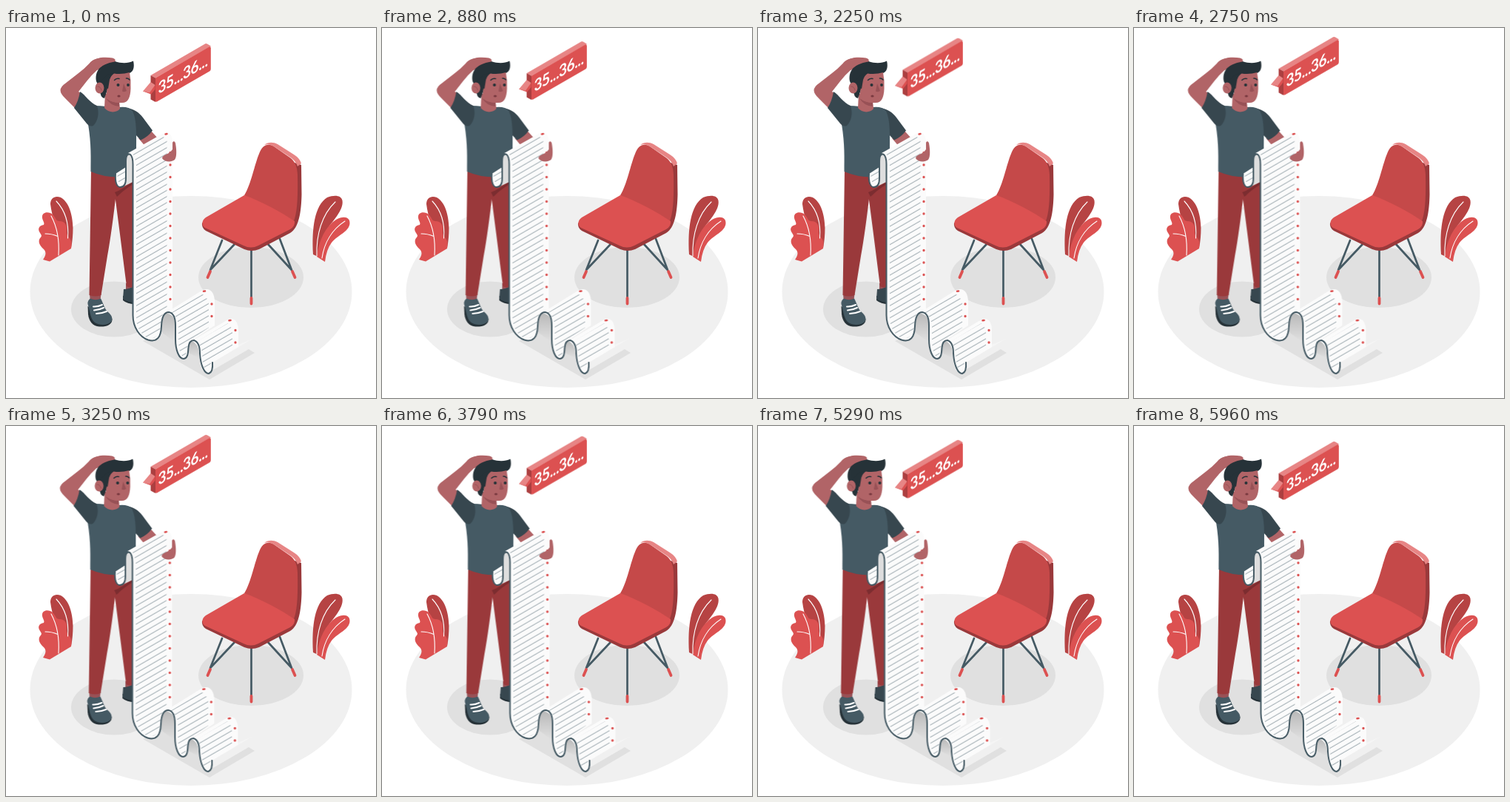
These frames come from a looping animation (500x500 px, 6 s). An HTML page without scripts:

```html
<!DOCTYPE html>
<html lang="en">
<head>
<meta charset="utf-8">
<title>Counting chairs</title>
<style>
  html, body { margin: 0; width: 100%; height: 100%; overflow: hidden; background: #fff; }
  svg { display: block; width: 100vw; height: 100vh; }
  .red { fill: #dc5151; }
  .mid { fill: #c54949; }
  .leaf { fill: #b64343; }
  .deep { fill: #9a393b; }
  .pink { fill: #e78585; }
  .skin { fill: #b16467; }
  .shade { fill: #985156; }
  .shirt { fill: #455a64; }
  .sleeve { fill: #37474f; }
  .ink { fill: #263238; }
  .floor { fill: #f0f0f0; }
  .shadow { fill: #e0e0e0; }
  .sheet { fill: #fbfbfb; }
  .line { fill: none; stroke-linecap: round; stroke-linejoin: round; }
  .vein { stroke: #fff; stroke-width: 1.1; }
  .steel { stroke: #455a64; stroke-width: 2.7; }
  .tip { stroke: #dc5151; stroke-width: 3.8; }
  .edge { stroke: #455a64; stroke-width: 2; }
  .lace { stroke: #fff; stroke-width: 2; }
  .face { stroke: #263238; stroke-width: 1.5; }
  .dots { stroke: #dc5151; stroke-width: 3.3; stroke-dasharray: 0 16.5; }
  text { font: 700 22px Lato, "Open Sans", sans-serif; letter-spacing: -.5px; fill: #fff; }

  .shake { animation: shake 6s linear infinite; }
  .float { animation: float 6s linear infinite; }
  @keyframes shake {
    0%, 100% { transform: translateX(0); }
    10%, 90% { transform: translateX(-1px); }
    20%, 80% { transform: translateX(2px); }
    30%, 50%, 70% { transform: translateX(-4px); }
    40%, 60% { transform: translateX(4px); }
  }
  @keyframes float {
    0%, 100% { transform: translateY(0); }
    50% { transform: translateY(-10px); }
  }
</style>
</head>
<body>
<svg viewBox="0 0 500 500">
  <defs>
    <pattern id="rules" width="60" height="8.25" patternUnits="userSpaceOnUse" patternTransform="skewY(-30)">
      <path d="M0 6.7H60" stroke="#87959d" stroke-width="1"/>
    </pattern>
    <pattern id="foldRules" href="#rules" patternTransform="translate(0 4.1) skewY(-30)"/>
    <linearGradient id="under" x2="0" y2="1">
      <stop offset="0" stop-color="#b9b9b9"/>
      <stop offset="1" stop-color="#e2e2e2"/>
    </linearGradient>
  </defs>

  <!-- floor -->
  <ellipse class="floor" cx="250" cy="356.5" rx="217.5" ry="129.5"/>
  <ellipse class="shadow" cx="146" cy="380" rx="58" ry="37.5"/>
  <ellipse class="shadow" cx="331" cy="337" rx="71" ry="41"/>
  <path class="shadow" d="M185 423L275 475L336 439L328 434L280 462L225 405Z"/>

  <!-- left plant -->
  <path class="leaf" d="M60 238C60 229 67 226 74 229C85 235 90 252 90.500 270Q90.500 285 88 297L72 300C70 275 62 255 60 238Z"/>
  <path class="red" d="M50 313C55 306 54 302 51 299C45 294 43 288 46 284C49 281 48 280 46 277C42 271 45 267 51 266C53 263 48 259 49 254C50 248 59 248 63 252C68 257 67 261 72 261C80 261 83 267 82 274C81 281 86 282 88 288Q89 292 88 298L59 315.500Z"/>
  <path class="line vein" d="M68 234Q86 253 83.500 284M61 254Q73 276 71 307M53 278Q62 278 70 281.500"/>

  <!-- right plant -->
  <path class="leaf" d="M415 306C413 270 417 240 434 229C444 225 453 226 454.500 233C457 246 440 262 434 272Q428 285 428 312Z"/>
  <path class="red" d="M420 309C423 286 432 268 446 259C457 253 465 256 464.500 264C464 275 448 280 440 290Q433 299 431 316Z"/>
  <path class="line vein" d="M420 308C419 279 427 252 445 235M427 311C430 290 441 272 458 261"/>

  <!-- chair -->
  <path class="line steel" d="M292 287L276 327L309 292M370 285L386 327L353 291M331.500 299V366"/>
  <path class="line tip" d="M276 329L272.500 337M387 329L390.500 337M331.500 365V372.500"/>
  <path class="deep" d="M265 263Q264 270 270 274L322 299Q332 303 342 299L384 277C396 270 399 248 399.500 225L399 185L390 182L380 255L330 290Z"/>
  <path class="mid" d="M322 226C331 212 336 184 342 170C346 158 354 155 362 160L385 176C391 181 393.500 188 394 198C394.500 225 394 245 390 258L385 268L345 262Z"/>
  <path class="pink" d="M349 158C354 154 361 154 367 157L389 171Q397 176 399 183L394 187Q392 181 386 176L362 160Q355 156 349 158Z"/>
  <path class="red" d="M270 256L322 226C345 234 372 249 390 261Q391 268 384 272L341 294Q331 299 321 294L269 270C264 267 264 260 270 256Z"/>

  <!-- speech bubble -->
  <g class="float">
    <path class="pink" d="M195.500 64L268 22Q270 20.500 272 21.500L277 24.500L202 67.500Z"/>
    <path fill="#ac3f40" d="M195.500 64L202 67.500V100L195.500 96.500Z"/>
    <path class="red" d="M202 67.500L274.500 25.500Q276.800 24.500 276.800 27V55.500Q276.800 57.500 275 58.500L204 99.500Q202 100.500 202 98.500Z"/>
    <path class="red" d="M185 85.500L201.500 77V83L196 89.500Z"/>
    <path class="pink" d="M185 85.500L195.500 73L201.500 77L194 87.500Z"/>
    <text transform="matrix(.866 -.5 0 1 205.500 89.500)">35...36...</text>
  </g>

  <g class="shake">
    <!-- legs and shoes -->
    <path class="shade" d="M113 359H128.500L127 372H114ZM162 345H174V358H162Z"/>
    <path class="ink" d="M110.500 376L111 387C112 396 117 403 126 403.500C136 404 144 401 143.500 393Z"/>
    <path class="shirt" d="M110.500 373Q110 368 114 365.500Q121 369 128 365.500C132 373 133 380 138 384C143 388 145 393 142 397C137 402 126 402 120 398C114 393 114 385 110.500 373Z"/>
    <path class="line lace" d="M118 376.500Q124 377 130 374M119 381.500Q126 381 132 378M122 386Q129 386 136 383"/>
    <path class="ink" d="M158 362L158 368Q165 374 177 373V362Z"/>
    <path class="sleeve" d="M159 353Q166 353 173 349L177 371Q164 371 158 366Z"/>
    <path class="deep" d="M144 200H174V349Q168 352 163 349C158 310 153 270 147 225Z"/>
    <path class="deep" d="M115 192L172 197L171 210L149 222Q143 275 137 308L128.500 361Q121 364 112.500 361Z"/>
    <path fill="#7c2d30" d="M147 222Q158 218 172 207V211Q160 218 150 228Z"/>

    <!-- far arm -->
    <path class="skin" d="M179 149L196 139L206 150L190 162Z"/>
    <path class="sleeve" d="M163 108C172 109 180 114 185 121L198 138.500Q192 147 182 151.500L174 143Z"/>

    <!-- torso and raised arm -->
    <path class="skin" d="M94 109L80 95Q73.500 89 73.500 84Q74 79 80 75L98 61Q106 55 113 47.500C120 39 134 39 147 42L148 47C138 49 131 54 123 57Q115 64 109 72L98 86L106 91Z"/>
    <path class="shirt" d="M119 105Q128 105 135 106L154 107Q166 106 171 112C177 124 176 145 176 167V199Q142 206 114.500 194C114.500 176 115.500 158 111 130Z"/>
    <path class="sleeve" d="M100 86C108 91 113 101 123 105C126 114 125 125 118 132Q113 134 109 129L92 108Q98 99 100 86Z"/>

    <!-- head -->
    <path class="skin" d="M134 88L133 108C138 115 150 115 154 109L153 98Z"/>
    <path class="shade" d="M135 95Q143 101 153 101L153 106Q141 105 135 95Z"/>
    <path class="ink" d="M122 72C119 55 133 46 147 45C156 48 165 48 172 44.500C174 53 172 59 167 61L140 75L133 95Q127 94 127 83Z"/>
    <path class="skin" d="M137 80C138 70 140 65 146 61.500Q157 63 167 60Q169 70 168.500 82C168 94 165 101 157 101C147 101 139 99 135 93Z"/>
    <path class="ink" d="M128 72L137 63L147 60Q142 64 140 70L138 82L134 81Z"/>
    <ellipse class="skin" cx="126.500" cy="81" rx="6" ry="7.500"/>
    <path class="line" stroke="#985156" d="M124 79Q128 79 129 84"/>
    <path class="skin" d="M113 47.500C120 39 134 39 144 40.500Q149 42 147 45.500C137 47 129 51 123 57Z"/>
    <path class="line face" d="M146.500 70.500Q149 67.500 153 68.500M162.500 68Q165 67.500 167 70"/>
    <circle class="ink" cx="151.500" cy="77" r="2"/>
    <circle class="ink" cx="165" cy="77" r="1.900"/>
    <path class="shade" d="M159 75L163 85Q160 87 157 85.500Z"/>
    <ellipse cx="152.500" cy="92" rx="2.100" ry="1.600" fill="#7a3a40"/>

    <!-- paper: back flap -->
    <path class="sheet" d="M148 197L162 188V206Q160 215 153 215Q148 212 148 197Z"/>
    <path fill="url(#rules)" d="M150 198L161 191V204Q158 212 153 212Z"/>
    <path fill="#dedede" d="M162 206V178Q164 169 169 172Q171.500 176 171.500 184V208L157 215Z"/>

    <!-- paper: long strip -->
    <path class="sheet" d="M165 169L213 142C222 139 225 146 225 156V380L216 385C211 390 211 396 210 406C209 420 200 426 190 421C178 416 171.500 405 171.500 390V183Q171.500 172 165 169Z"/>
    <path fill="url(#rules)" d="M171 169L212 146L217.500 152V379Q210 385 209 403C207 416 200 422 191 419C181 413 176 403 176 390V182Z"/>
    <path class="line dots" d="M222 168.500V370"/>
    <path class="line" stroke="#dc5151" stroke-width="2.400" d="M215.500 143.500L217.500 143"/>

    <!-- paper: middle fold -->
    <path fill="url(#under)" d="M210 411C211 391 213 385 219 385C227 386 229 396 229 410V425Z"/>
    <path class="sheet" d="M216 385L266 354C276 350 282 358 282 370V402L252 422C246 427 246 435 245 441C243 448 238 449 235 445C229 438 229 430 229 420V400Q229 388 216 385Z"/>
    <path fill="url(#foldRules)" d="M223 385L265 359L274 368V405L250 421C244 428 246 436 242 443C237 447 233 436 233 420V400Q231 389 223 385Z"/>
    <path class="line dots" d="M278 373V405"/>
    <path class="line" stroke="#dc5151" stroke-width="2.600" d="M267 355.800L269 355.500"/>

    <!-- paper: last fold and tail -->
    <path fill="url(#under)" d="M245 438C246 426 249 422 254 422C260 424 262 436 262 447Z"/>
    <path fill="#f5f5f5" d="M279 451L314 428L333 420L279 452Z"/>
    <path class="sheet" d="M251 423L300 394C309 390 314 398 314 408V431L279 452C279 465 274 469 268 465C263 460 262 452 261 440Q260 426 251 423Z"/>
    <path fill="url(#foldRules)" d="M258 424L300 399L306 407V431L277 449C277 461 273 465 269 461C265 456 266 448 265 440Q264 429 258 424Z"/>
    <path class="line dots" d="M310 408.500V426"/>
    <path class="line" stroke="#dc5151" stroke-width="2.600" d="M301.500 395.300L303.500 395"/>

    <path class="line edge" d="M148 197C147 209 150 215 154.500 215C160 215 162 210 162 203V181C162 171 165 169 168 171Q171.500 174 171.500 184V388C171.500 405 181 418 192 421.500C204 425 209.500 418 210 403C210.500 389 214 384 220 384C226 385 229 391 229 402V420C229 436 234 447 240 447C246 446 246 439 246.500 432C247 425 250 422 254 422C260 424 262 431 262 440C263 456 268 467 274 467Q280 465 279 452"/>

    <!-- holding hand -->
    <path class="skin" d="M225 155C226 152 229 153 229.200 157C230.500 165 231 174 228 178C223 182 214 181 211 176C212 170 220 172 225 164Z"/>
  </g>
</svg>
</body>
</html>
```
